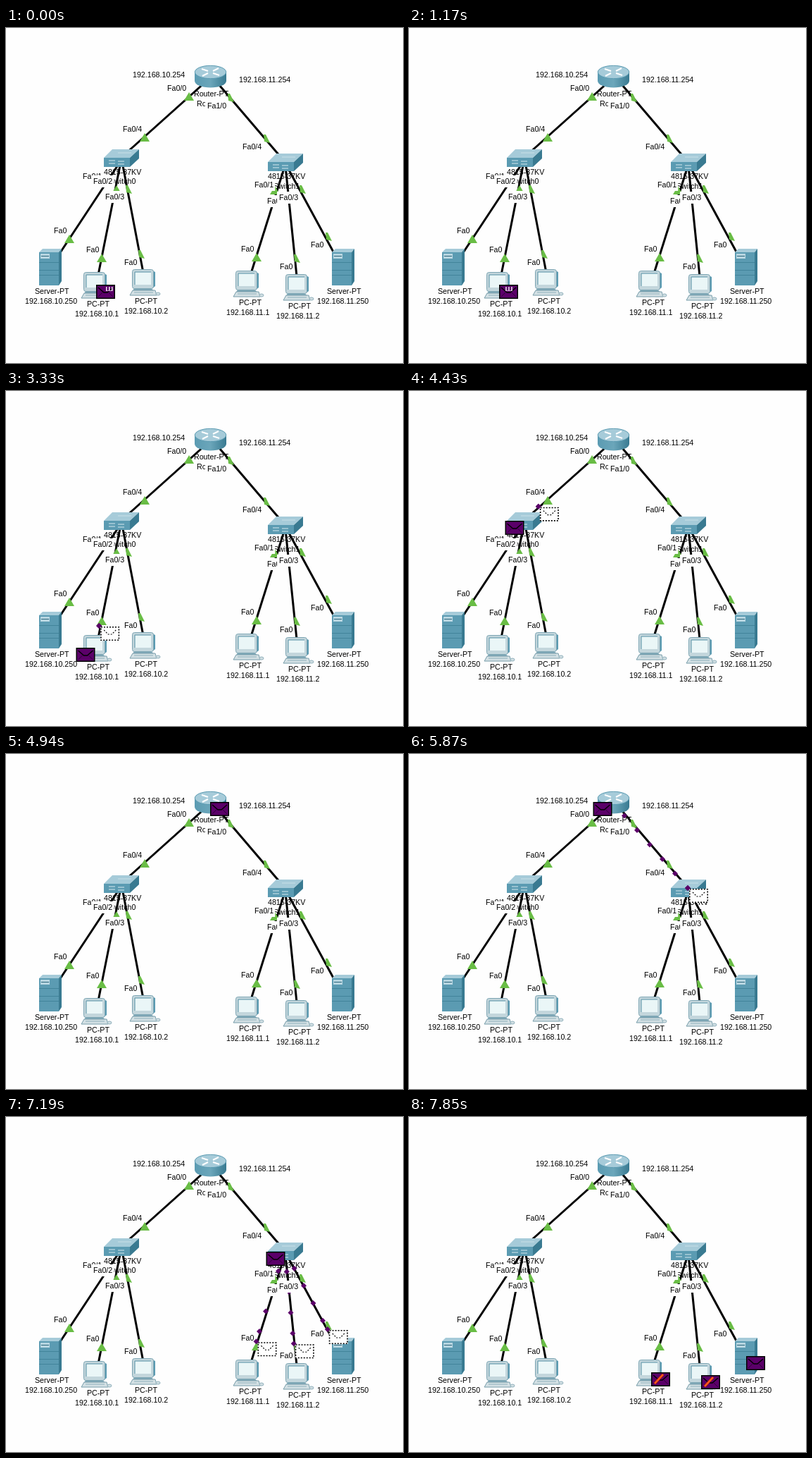
These frames come from a looping animation (564x475 px, 7990 ms). An HTML page with a canvas:

```html
<!DOCTYPE html>
<html lang="en">
<head>
<meta charset="utf-8">
<title>Network packet simulation</title>
<style>
  html, body { margin: 0; width: 100%; height: 100%; overflow: hidden; background: #fefefe; }
  canvas { display: block; }
</style>
</head>
<body>
<canvas id="stage" width="564" height="475"></canvas>
<script>
const LOOP = 7990;
const BG = '#fefefe', BLACK = '#000', PURPLE = '#5b0069', GREEN = '#69bd45';
const LIGHT = '#a6cbd9', MID = '#5b9bb2', DARK = '#397a91', EDGE = '#2f687d';
const ctx = document.getElementById('stage').getContext('2d');

function poly(points, fill, stroke, width = 1) {
  ctx.beginPath();
  points.forEach(([x, y]) => ctx.lineTo(x, y));
  if (fill) { ctx.closePath(); ctx.fillStyle = fill; ctx.fill(); }
  if (stroke) { ctx.strokeStyle = stroke; ctx.lineWidth = width; ctx.stroke(); }
}

function rect(x, y, w, h, fill) {
  ctx.fillStyle = fill;
  ctx.fillRect(x, y, w, h);
}

function at(x, y, draw) {
  ctx.save();
  ctx.translate(x, y);
  draw();
  ctx.restore();
}

function text(label, x, y) {
  ctx.font = '10.67px "Liberation Sans", Arial, sans-serif';
  ctx.fillStyle = BLACK;
  ctx.fillText(label, x, y);
}

// Port labels hide what lies behind them.
function port(label, x, y) {
  ctx.font = '10.67px "Liberation Sans", Arial, sans-serif';
  rect(x - 3, y - 12, ctx.measureText(label).width + 5, 17, BG);
  text(label, x, y);
}

function router() {
  const body = ctx.createLinearGradient(0, 0, 45, 0);
  body.addColorStop(0, MID);
  body.addColorStop(0.5, '#6ba6ba');
  body.addColorStop(1, DARK);
  ctx.fillStyle = body;
  ctx.beginPath();
  ctx.moveTo(0, 9);
  ctx.lineTo(0, 22);
  ctx.ellipse(22.5, 22, 22.5, 9.5, 0, Math.PI, 0, true);
  ctx.lineTo(45, 9);
  ctx.fill();
  ctx.fillStyle = LIGHT;
  ctx.strokeStyle = MID;
  ctx.lineWidth = 1;
  ctx.beginPath();
  ctx.ellipse(22.5, 9.5, 22.2, 9.2, 0, 0, 7);
  ctx.fill();
  ctx.stroke();
  for (const [x, y, dx, dy] of [[19, 8, -9, -3], [26, 11, 9, 3], [34, 4, -8, 4], [11, 15, 8, -4]]) {
    poly([[x, y], [x + dx, y + dy]], null, '#fff', 2);
  }
}

function networkSwitch() {
  poly([[0, 12], [12, 0], [50, 0], [37, 12]], LIGHT);
  poly([[37, 12], [50, 0], [50, 13], [37, 25]], DARK);
  rect(0, 12, 37, 13, MID);
  for (const y of [16, 20]) {
    poly([[7, y], [16, y]], null, '#d5e8ee');
    poly([[20, y + 1], [29, y + 1]], null, '#d5e8ee');
  }
  poly([[20, 5], [39, 5]], null, '#c9e0e8');
}

function server() {
  poly([[0, 5], [5, 0], [32, 0], [28, 5]], LIGHT);
  poly([[28, 5], [32, 0], [32, 46], [28, 52]], DARK);
  rect(0, 5, 28, 47, MID);
  rect(2, 7, 13, 7, '#b8d6e1');
  rect(3, 10, 11, 1, EDGE);
  for (const y of [19, 30, 37]) rect(0, y, 28, 1, '#41849a');
}

function pc() {
  poly([[32, 2], [36, 4], [36, 24], [32, 27]], MID);
  poly([[6, 27], [30, 27], [35, 31], [4, 31]], '#7fa9b8');
  ctx.fillStyle = '#c3d6dc';
  ctx.strokeStyle = '#7da5b3';
  ctx.lineWidth = 1;
  ctx.beginPath();
  ctx.roundRect(3.5, 0.5, 30, 27, 3);
  ctx.fill();
  ctx.stroke();
  rect(7, 4, 23, 18, '#eaf6f7');
  poly([[7, 22], [7, 4], [30, 4]], null, '#548fa4');
  poly([[4, 30], [36, 30], [38, 37], [0, 37]], '#d3e0e4', '#789daa');
  poly([[6, 33], [33, 33]], null, '#8fb0bb');
  ctx.beginPath();
  ctx.ellipse(40, 35, 3, 2, 0, 0, 7);
  ctx.fillStyle = '#d3e0e4';
  ctx.fill();
  ctx.stroke();
}

// Links that lean right show only the outer part of their light.
const light = (x, y) => poly([[x, y - 6], [x + 7, y + 6], [x - 7, y + 6]], GREEN);
const cutLight = (x, y) => poly([[x - 3, y - 6], [x, y - 6], [x + 6, y + 6], [x - 2, y + 4]], GREEN);

function network() {
  rect(0, 0, 564, 475, BG);

  text('Router-PT', 267, 97);
  text('Router0', 271, 111);
  text('4815-37KV', 139, 208);
  text('Switch0', 147, 221);
  text('4815-37KV', 372, 214);
  text('Switch1', 380, 228);

  for (const [x1, y1, x2, y2] of [
    [284, 76, 170, 178], [303, 81, 392, 185],
    [162, 190, 76, 320], [163, 190, 131, 350], [165, 190, 195, 347],
    [396, 196, 348, 348], [397, 196, 413, 352], [399, 196, 467, 321]
  ]) poly([[x1, y1], [x2, y2]], null, BLACK, 3);

  for (const [x, y] of [[260, 97], [197, 155], [90, 299], [136, 326], [157, 229], [356, 325], [382, 230]]) light(x, y);
  for (const [x, y] of [[318, 99], [369, 157], [173, 229], [191, 321], [412, 327], [420, 229], [457, 296]]) cutLight(x, y);

  at(268, 53, router);
  at(139, 172, networkSwitch);
  at(372, 178, networkSwitch);
  at(47, 313, server);
  at(463, 313, server);
  for (const [x, y] of [[107, 346], [176, 342], [323, 344], [394, 349]]) at(x, y, pc);

  for (const [name, x, y, address, ax] of [
    ['Server-PT', 41, 377, '192.168.10.250', 27],
    ['PC-PT', 115, 395, '192.168.10.1', 98],
    ['PC-PT', 183, 391, '192.168.10.2', 168],
    ['PC-PT', 331, 393, '192.168.11.1', 313],
    ['PC-PT', 401, 398, '192.168.11.2', 384],
    ['Server-PT', 456, 377, '192.168.11.250', 442]
  ]) {
    text(name, x, y);
    text(address, ax, y + 14);
  }
  text('192.168.10.254', 180, 70);
  text('192.168.11.254', 331, 77);
}

function ports() {
  for (const [label, x, y] of [
    ['Fa0/0', 229, 89], ['Fa1/0', 286, 114], ['Fa0/4', 166, 147], ['Fa0/4', 336, 172],
    ['Fa0/1', 109, 214], ['Fa0/2', 124, 221], ['Fa0/3', 141, 243],
    ['Fa0/1', 353, 226], ['Fa0/2', 371, 249], ['Fa0/3', 388, 244],
    ['Fa0', 68, 291], ['Fa0', 114, 318], ['Fa0', 168, 336],
    ['Fa0', 334, 317], ['Fa0', 389, 342], ['Fa0', 433, 311]
  ]) port(label, x, y);
}

function envelope([x, y]) {
  at(x, y, () => {
    rect(0, 0, 27, 20, BLACK);
    rect(1.5, 1.5, 24, 17, PURPLE);
    poly([[3, 4], [11, 11], [16, 11], [24, 4]], null, BLACK, 1.3);
    poly([[3, 17], [9, 11]], null, '#30003a');
    poly([[24, 17], [18, 11]], null, '#30003a');
  });
}

function outline([x, y]) {
  at(x, y, () => {
    rect(0, 0, 27, 20, '#fff');
    ctx.setLineDash([2, 2]);
    ctx.strokeStyle = BLACK;
    ctx.lineWidth = 1.6;
    ctx.strokeRect(0.8, 0.8, 25.4, 18.4);
    poly([[5, 5], [11, 11], [16, 11], [22, 5]], null, BLACK, 1.2);
  });
}

const diamond = ([x, y]) => poly([[x - 2, y - 5], [x + 2, y - 1], [x - 2, y + 3], [x - 6, y - 1]], PURPLE);

// Marks that jump across the waiting packet.
function waitingMarks(time) {
  const step = Math.floor((time + 32) / 130.5);
  at(133 + (6 + 4.8 * step) % 12, 366, () => {
    for (const x of [3, 7, 11]) rect(x, 1, 1.5, 6, '#f4eaf6');
    rect(4, 6, 7, 1, '#c9a5d0');
  });
}

function slash([x, y], size) {
  const line = [[x + 5, y + 16], [x + 5 + 12 * size, y + 16 - 13 * size]];
  poly(line, null, '#a01c10', 4);
  poly(line, null, '#ff5a1e', 2.5);
}

const PC = [128, 364], LEFT = [165, 184], ROUTER = [290, 68], RIGHT = [398, 191];
const ENDS = [[344, 362], [415, 366], [479, 339]];
// Each hop: sender, receivers, [time, progress] steps, arrival time.
const HOPS = [
  [PC, [LEFT], [[3330, 1 / 6], [3450, 5 / 12], [3570, 2 / 3], [3690, 11 / 12]], 3840],
  [LEFT, [ROUTER], [[4430, 1 / 6], [4580, 5 / 12], [4700, 2 / 3], [4820, 11 / 12]], 4940],
  [ROUTER, [RIGHT], [[5720, 1 / 3], [5870, 1]], 6020],
  [RIGHT, ENDS, [[6920, 1 / 3], [7070, 0.54], [7190, 0.75], [7310, 0.96]], 7460]
];
const mix = (a, b, p) => a.map((v, i) => v + (b[i] - v) * p);

function draw(time) {
  network();
  const hop = HOPS.filter(([, , steps]) => time >= steps[0][0]).pop();
  if (!hop) {
    ports();
    envelope(PC);
    if (time < 2110) waitingMarks(time);
    return;
  }
  const [from, targets, steps, arrival] = hop;
  if (time >= arrival) {
    ports();
    targets.forEach(envelope);
    if (time >= 7730) ENDS.slice(0, 2).forEach(p => slash(p, time < 7850 ? 0.5 : 1));
    return;
  }
  const [, progress] = steps.filter(([start]) => time >= start).pop();
  for (const to of targets) {
    for (let p = 1 / 6; p <= progress + 0.01; p += 1 / 6) diamond(mix(from, to, p));
  }
  ports();
  for (const to of targets) {
    const place = mix(from, to, progress);
    outline(place);
    diamond(place);
  }
  if (progress < 0.9 || from === ROUTER) envelope([from[0] - 28.5, from[1]]);
}

function frame(now) {
  draw(now % LOOP);
  requestAnimationFrame(frame);
}
requestAnimationFrame(frame);
</script>
</body>
</html>
```
